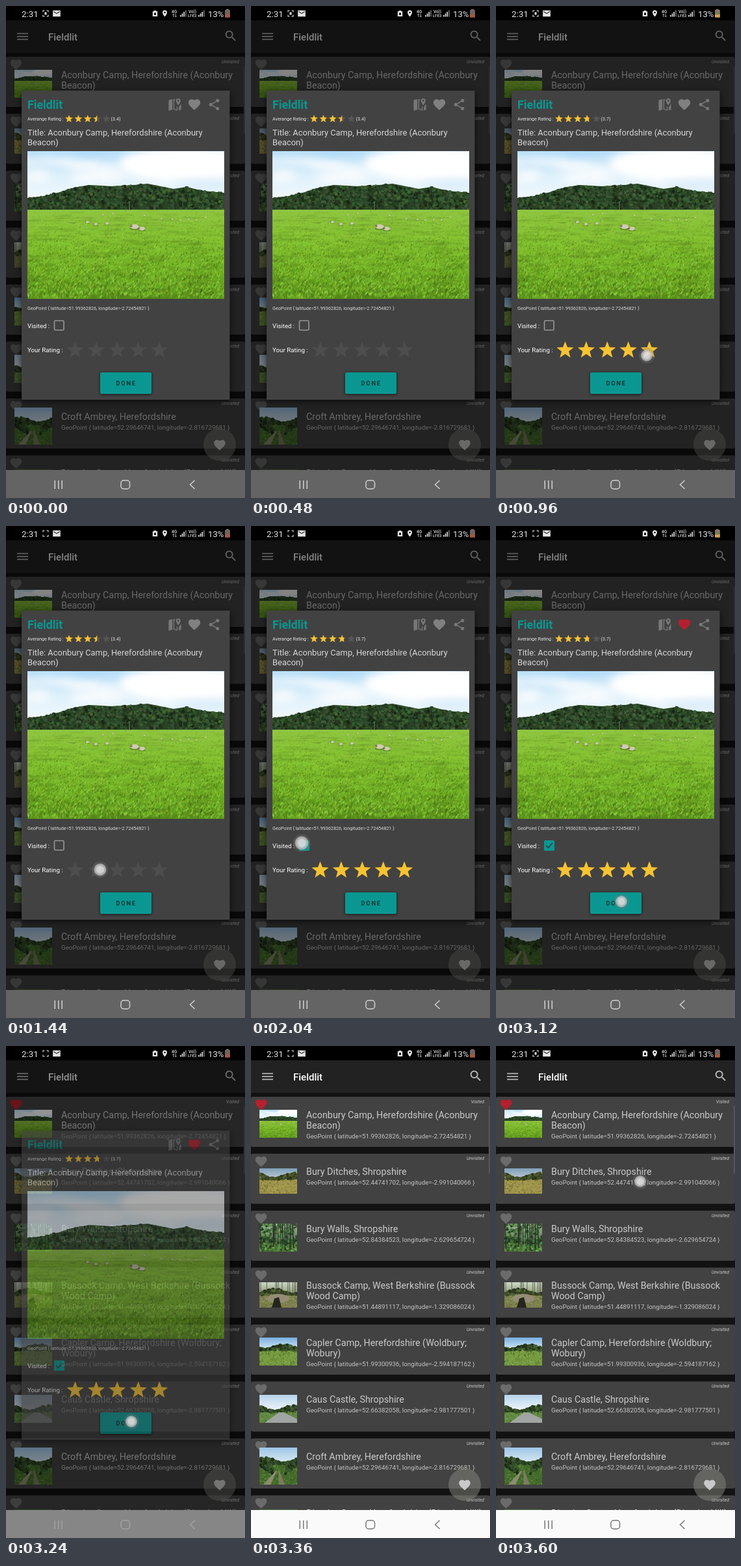
An HTML page with a canvas for the animation above (3.72 s loop, 368 by 756 pixels).

```html
<!DOCTYPE html>
<html lang="en">
<head>
<meta charset="utf-8">
<title>Fieldlit</title>
<style>
html, body { margin: 0; width: 100%; height: 100%; overflow: hidden; background: #000; }
canvas { display: block; }
</style>
</head>
<body>
<canvas id="stage" width="368" height="756"></canvas>
<script>
const W = 368, H = 756, LOOP = 3720, STEP = 120, TAU = Math.PI * 2;
const TEAL = '#0a9792', GOLD = '#f8c331', RED = '#b5202f';
const ICONS = {
  heart: 'M12 21.35l-1.45-1.32C5.4 15.36 2 12.28 2 8.5 2 5.42 4.42 3 7.5 3c1.74 0 3.41.81 4.5 2.09C13.09 3.81 14.76 3 16.5 3 19.58 3 22 5.42 22 8.5c0 3.78-3.4 6.86-8.55 11.54z',
  search: 'M15.5 14h-.8l-.3-.3A6.5 6.5 0 1 0 13.7 14.4l.3.3v.8l5 5 1.5-1.5zM9.5 14a4.5 4.5 0 1 1 0-9 4.5 4.5 0 0 1 0 9z',
  share: 'M18 16c-.8 0-1.4.3-2 .8l-7.1-4.1c.1-.5.1-.9 0-1.4L16 7.2A3 3 0 1 0 15 5l.1.7L8 9.8a3 3 0 1 0 0 4.4l7.1 4.2A2.9 2.9 0 1 0 18 16z',
  map: 'M2 5l6-2v17l-6 2zM9.5 3l3 1v2l-1.500-.5v13l4 1.500v-6l1.500 2v6l-7-2.500zM18.500 16l3.500-5v9l-3.500 1.500zM17.500 2a3.700 3.700 0 0 0-3.700 3.700c0 3 3.700 7.300 3.700 7.300s3.700-4.300 3.700-7.300A3.700 3.700 0 0 0 17.500 2zm0 2.300a1.400 1.400 0 1 1 0 2.800 1.400 1.400 0 0 1 0-2.800z',
  pin: 'M12 2a7 7 0 0 0-7 7c0 5.2 7 13 7 13s7-7.800 7-13a7 7 0 0 0-7-7zm0 4.500a2.500 2.500 0 1 1 0 5 2.500 2.500 0 0 1 0-5z',
  mail: 'M2 4h20v16H2zM4 6v2l8 5 8-5V6l-8 5z',
  lock: 'M4 5h4V2h8v3h4v17H4zM9 11v6h6v-6h-1V9h-4v2z'
};
const stage = document.getElementById('stage').getContext('2d');
let g = stage;

function layer(w, h, draw) {
  const c = document.createElement('canvas'), previous = g;
  c.width = w; c.height = h;
  g = c.getContext('2d');
  draw();
  g = previous;
  return c;
}
function rect(x, y, w, h, color, r = 0) {
  g.fillStyle = color;
  g.beginPath(); g.roundRect(x, y, w, h, r); g.fill();
}
function raised(blur, ...box) {
  g.shadowColor = '#000a'; g.shadowBlur = blur; g.shadowOffsetY = blur / 4;
  rect(...box);
  g.shadowColor = 'transparent';
}
function disc(x, y, r, color, ry = r) {
  g.fillStyle = color;
  g.beginPath(); g.ellipse(x, y, r, ry, 0, 0, TAU); g.fill();
}
function line(points, color, width = 1) {
  g.strokeStyle = color; g.lineWidth = width;
  g.beginPath(); points.forEach(p => g.lineTo(...p)); g.stroke();
}
function poly(points, color) {
  g.fillStyle = color;
  g.beginPath(); points.forEach(p => g.lineTo(...p)); g.fill();
}
function text(s, x, y, size, color, style = '', align = 'left', spacing = 0) {
  g.font = `${style} ${size}px Roboto, sans-serif`;
  g.letterSpacing = spacing + 'px';
  g.fillStyle = color; g.textAlign = align;
  g.fillText(s, x, y);
}
function icon(name, x, y, size, color) {
  g.save();
  g.translate(x - size / 2, y - size / 2);
  g.scale(size / 24, size / 24);
  g.fillStyle = color;
  g.fill(new Path2D(ICONS[name]), 'evenodd');
  g.restore();
}
function fade(y0, y1, ...colors) {
  const f = g.createLinearGradient(0, y0, 0, y1);
  colors.forEach((c, i) => f.addColorStop(i / (colors.length - 1), c));
  return f;
}
function random(seed) {
  return () => (seed = seed * 16807 % 2147483647) / 2147483647;
}

// Landscapes
const MEADOW = layer(303, 227, () => {
  const rnd = random(77);
  rect(0, 0, 303, 90, fade(0, 80, '#b6def8', '#dff1fb', '#f4fafc'));
  g.filter = 'blur(7px)';
  for (let i = 0; i < 13; i++) disc(rnd() * 130, 10 + rnd() * 45, 16 + rnd() * 16, '#ffffffa0', 7);
  disc(245, 20, 105, '#fff', 28);
  disc(60, 3, 55, '#addaf7', 6);
  disc(270, 50, 45, '#d3e9f8', 5);
  g.filter = 'none';
  const ridge = [[0, 70], [25, 67], [50, 61], [72, 54], [95, 50], [130, 52], [165, 50], [185, 48], [205, 52], [225, 56], [245, 53], [270, 59], [303, 62]];
  poly([...ridge.map(([x, y]) => [x, y + 2]), [303, 92], [0, 92]], '#2a4526');
  const top = x => {
    const i = Math.max(1, ridge.findIndex(p => p[0] >= x));
    const [a, b] = [ridge[i - 1], ridge[i]];
    return a[1] + (b[1] - a[1]) * (x - a[0]) / (b[0] - a[0]);
  };
  for (let i = 0; i < 1500; i++) {
    const x = rnd() * 302, y0 = top(x) + 3, d = rnd();
    disc(x, y0 + d * (89 - y0), .7 + rnd() * 2.3, `hsl(${92 + rnd() * 35} ${20 + rnd() * 18}% ${11 + rnd() * 20}%)`);
  }
  rect(0, 90, 303, 137, fade(90, 227, '#8fc440', '#82be2f', '#70ad23', '#5b931c'));
  // Uneven ground, coarser towards the viewer
  for (let i = 0; i < 420; i++) {
    const d = rnd();
    disc(rnd() * 303, 91 + d * 136, 5 + rnd() * 17, `hsl(${78 + rnd() * 16} 68% ${rnd() < .55 ? 24 : 56}% / .13)`, 1 + d * 3);
  }
  for (let i = 0; i < 4600; i++) {
    const d = rnd() ** .8, x = rnd() * 303, y = 92 + d * 135;
    line([[x, y], [x + (rnd() - .5) * 7 * d + 1, y - 1 - d * 3]],
      `hsl(${77 + rnd() * 19} 66% ${20 + rnd() * 43}% / .55)`, .6 + d);
  }
  line([[157, 77], [157, 91]], '#718071', 1);
  const sheep = (x, y, s) => {
    disc(x, y + s * .45, s * 1.1, '#4f7822', s * .3);
    disc(x, y, s, '#d0cbb0', s * .58);
    disc(x - s * .8, y - s * .15, s * .3, '#847c69');
  };
  [[92, 109], [105, 112], [122, 111], [116, 98], [131, 96], [180, 99], [206, 104], [223, 105], [235, 106], [248, 105], [260, 106], [274, 102]]
    .forEach(([x, y], i) => sheep(x, y, i < 3 ? 3 : 1.7));
  sheep(176, 119, 5); sheep(165, 116, 6.5);
});

function scene({ seed, h, sky, ground, tree, horizon, detail }) {
  return layer(58, h, () => {
    const rnd = random(seed), y0 = h * horizon;
    rect(0, 0, 58, h, fade(0, y0, ...sky));
    rect(0, y0, 58, h, ground);
    for (let i = 0; i < 170; i++) {
      const x = rnd() * 58;
      disc(x, y0 - rnd() * (5 + 4 * Math.sin(x / 9 + seed)), 1 + rnd() * 2,
        `hsl(${tree} ${24 + rnd() * 18}% ${12 + rnd() * 19}%)`);
    }
    for (let i = 0; i < 260; i++) {
      disc(rnd() * 58, y0 + 1 + rnd() * (h - y0), 1, `hsl(${tree - 15} 42% ${18 + rnd() * 38}% / .4)`);
    }
    if (detail) detail(rnd, h);
  });
}
function woods(rnd, h) {
  for (let i = 0; i < 330; i++) {
    disc(rnd() * 58, rnd() * h, .5 + rnd() * 2, `hsl(${90 + rnd() * 35} 32% ${10 + rnd() * 46}% / .75)`);
  }
  for (let i = 0; i < 13; i++) {
    const x = rnd() * 58;
    line([[x, 0], [x + rnd() * 3 - 1, h * (.7 + rnd() * .25)]], '#263127', .7 + rnd());
  }
}
function stump(rnd, h) {
  for (let i = 0; i < 11; i++) {
    const x = rnd() * 58;
    line([[x, 0], [x, h * .5]], '#445039', .8);
  }
  disc(29, 25, 17, '#948c75', 7);
  poly([[19, 39], [23, 25], [30, 23], [34, 39]], '#24261d');
}
function lane(rnd) {
  for (let i = 0; i < 150; i++) {
    const side = rnd() < .6, d = rnd();
    disc(side ? d * 21 : 58 - d * 18, 17 + d * 14 + rnd() * 10, 1 + rnd() * 2, `hsl(102 32% ${10 + rnd() * 18}%)`);
  }
  poly([[25, 36], [27, 36], [17, 57], [6, 57]], '#8d8c72');
  poly([[29, 36], [31, 36], [39, 57], [30, 57]], '#7c7b60');
}
const THUMBS = [
  MEADOW,
  scene({ seed: 21, h: 39, sky: ['#7f9fb9', '#c0cbd2'], ground: '#a2954f', tree: 75, horizon: .42 }),
  scene({ seed: 32, h: 43, sky: ['#a3b99c', '#556f49'], ground: '#4c7436', tree: 108, horizon: .68, detail: woods }),
  scene({ seed: 43, h: 39, sky: ['#cfd7c8', '#8c9a74'], ground: '#7d8055', tree: 83, horizon: .48, detail: stump }),
  scene({ seed: 54, h: 43, sky: ['#78afe0', '#d9e9f3'], ground: '#779d43', tree: 98, horizon: .44 }),
  scene({ seed: 65, h: 43, sky: ['#b6d4ec', '#f4f7f9'], ground: '#608844', tree: 101, horizon: .6,
    detail: () => poly([[30, 27], [37, 27], [58, 37], [58, 43], [8, 43]], '#a0a5a3') }),
  scene({ seed: 76, h: 57, sky: ['#9dc5e7', '#dce9f0'], ground: '#426a2b', tree: 101, horizon: .43, detail: lane }),
  scene({ seed: 87, h: 40, sky: ['#4e7040', '#648747'], ground: '#567939', tree: 102, horizon: .4 })
];
const SITES = [
  ['Aconbury Camp, Herefordshire (Aconbury|Beacon)', '51.99362826', '-2.72454821'],
  ['Bury Ditches, Shropshire', '52.44741702', '-2.991040066'],
  ['Bury Walls, Shropshire', '52.84384523', '-2.629654724'],
  ['Bussock Camp, West Berkshire (Bussock|Wood Camp)', '51.44891117', '-1.329086024'],
  ['Capler Camp, Herefordshire (Woldbury;|Wobury)', '51.99300936', '-2.594187162'],
  ['Caus Castle, Shropshire', '52.66382058', '-2.981777501'],
  ['Croft Ambrey, Herefordshire', '52.29646741', '-2.816729681'],
  ['Dinedor Camp, Herefordshire (Dinedor Hill)', '52.02349600', '-2.696478000']
];
const geo = ([, lat, lon]) => `GeoPoint { latitude=${lat}, longitude=${lon} }`;

function drawList(saved) {
  rect(0, 0, W, H, '#121212');
  rect(0, 22, W, 50, '#222');
  [42, 46.5, 51].forEach(y => rect(17, y - .5, 17, 1.7, '#b9b9b9'));
  text('Fieldlit', 65, 52.5, 15, '#fff', '500');
  icon('search', 346, 46, 22, '#bdbdbd');
  SITES.forEach((site, i) => {
    const y = 78 + i * 87.5, lines = site[0].split('|'), pic = THUMBS[i];
    const h = i ? pic.height : 43;
    rect(0, y, W, 77, '#424242', 3);
    icon('heart', 15.5, y + 12, 21, saved && !i ? RED : '#6b6b6b');
    g.drawImage(pic, 13, Math.round(y + 41.5 - h / 2 + (i === 6 ? .5 : 0)), 58, h);
    lines.forEach((s, n) => text(s, 85, y + 32.5 + n * 16.3, 14.3, '#cacaca'));
    text(geo(site), 85, y + 47.5 + (lines.length - 1) * 16.3, 9.77, '#c4c4c4');
    text(saved && !i ? 'Visited' : 'Unvisited', 359, y + 9.5, 6.8, '#c9c9c9', 'italic', 'right');
  });
  rect(366, 92, 2, 104, '#565656');
  disc(329, 674, 25, '#86868080');
  icon('heart', 329, 674.5, 21, '#c9c9c9');
}

function drawStatus(t) {
  rect(0, 0, W, 22, '#000');
  const c = '#e4e4e4';
  text('2:31', 24, 16.5, 13.4, c);
  [[57, 7, 1, 1], [65, 7, -1, 1], [57, 16, 1, -1], [65, 16, -1, -1]].forEach(([x, y, a, b]) =>
    line([[x, y + b * 2.5], [x, y], [x + a * 2.5, y]], c, 1.1));
  if (t < 1200 || t >= 3480) rect(59.5, 9.5, 3, 4, c);
  icon('mail', 78, 11.5, 14, c);
  icon('lock', 229.5, 11.5, 11, c);
  icon('pin', 244.5, 11.5, 12, c);
  text('4G', 255, 10.5, 6.5, c, '500');
  line([[258, 17], [258, 12], [256.5, 14]], c, .8);
  line([[261, 12], [261, 17], [262.5, 15]], c, .8);
  text('Vo))', 281, 10.5, 6.3, c, '500');
  text('LTE2', 280, 17, 6.2, c, '500');
  [268, 296].forEach(x => {
    for (let i = 0; i < 4; i++) rect(x + i * 2.7, 14 - i * 2.5, 1.6, 2.5 + i * 2.5, i < 3 ? c : '#777');
  });
  text('13%', 311, 16.5, 13.2, c);
  const bright = t >= 840 && t < 1200 || t >= 2400 && t < 3240;
  rect(339, 5, 4, 2, '#8b8580');
  rect(337, 6, 8, 11.5, bright ? '#81765c' : '#71625b', 1);
  rect(337, 13, 8, 4.5, bright ? '#c8a64b' : '#a6583c', 1);
}

function drawNav(background, color) {
  rect(0, 713, W, 43, background);
  [75, 80.5, 86].forEach(x => rect(x - .5, 729, 1.5, 13, color));
  g.strokeStyle = color; g.lineWidth = 1.5;
  g.beginPath(); g.roundRect(177, 729, 13.5, 13, 4); g.stroke();
  line([[290.5, 729], [283.5, 735.5], [290.5, 742]], color, 1.5);
}

function stars(x, y, gap, r, value, empty) {
  for (let i = 0; i < 5; i++) {
    const cx = x + i * gap, part = Math.max(0, Math.min(1, value - i));
    const points = Array.from({ length: 10 }, (_, k) => {
      const a = k * TAU / 10, q = k % 2 ? r * .42 : r;
      return [cx + q * Math.sin(a), y - q * Math.cos(a)];
    });
    poly(points, empty);
    g.save();
    g.beginPath(); g.rect(cx - r, y - r, 2 * r * part, 2 * r); g.clip();
    poly(points, GOLD);
    g.restore();
  }
}

function drawDialog({ rating, check, liked }) {
  raised(10, 24, 130, 320.5, 475, '#424242', 1);
  text('Fieldlit', 33, 158, 17.8, TEAL, 'bold');
  icon('map', 260, 151.5, 23, '#777');
  icon('heart', 290, 151.5, 22, liked ? RED : '#808080');
  icon('share', 320.5, 151.5, 21, '#777');
  const average = rating ? 3.7 : 3.4;
  text('Averange Rating :', 33, 175.5, 7.2, '#e4e4e4');
  stars(97, 173.5, 14.4, 6.3, rating ? 3.75 : 3.5, '#575757');
  text(`(${average})`, 161.5, 175.5, 7.2, '#e4e4e4');
  text('Title: Aconbury Camp, Herefordshire (Aconbury', 33, 198.7, 12.92, '#d6d6d6');
  text('Beacon)', 33, 213.5, 12.92, '#d6d6d6');
  g.drawImage(MEADOW, 33, 223);
  text(geo(SITES[0]), 33, 467, 7.23, '#dadada');
  text('Visited :', 33, 494.5, 9.65, '#fff');
  if (check) rect(74, 483, 16, 16, TEAL, 1.5);
  else {
    g.strokeStyle = '#969696'; g.lineWidth = 1.6;
    g.beginPath(); g.roundRect(74.5, 483.5, 14.5, 14.5, 1.5); g.stroke();
  }
  if (check > 1) line([[77, 491], [80.5, 494.5], [87, 487]], '#343f40', 1.7);
  text('Your Rating :', 33, 532, 9.75, '#fff');
  stars(106.5, 529, 32.4, 13.8, rating, '#4d4d4d');
  raised(4, 145, 563, 79, 33, TEAL, 2.5);
  text('DONE', 169.5, 583, 9.2, '#0c2524', '500', 'left', 1.8);
}

// Taps: start, end, x, y, radius
const TAPS = [
  [840, 1200, 232, 537, 9], [1320, 1560, 145, 528, 9.5], [1680, 1800, 236, 531, 9],
  [1920, 2280, 78, 487, 10.5], [2520, 2760, 290, 153, 9], [3000, 3360, 193, 577, 9],
  [3480, 3720, 222, 208, 9]
];
function drawTap(t) {
  const tap = TAPS.find(([a, b]) => t >= a && t < b);
  if (!tap) return;
  const [, , x, y, r] = tap;
  disc(x, y, r + 3, '#7777774d');
  const glow = g.createRadialGradient(x, y, r * .5, x, y, r);
  glow.addColorStop(0, '#e2e2e2e0');
  glow.addColorStop(1, '#b8b8b8a8');
  disc(x, y, r, glow);
}

function render(t) {
  const open = t < 3240, closing = t === 3240;
  const rating = t >= 1680 || t >= 960 && t < 1320 ? 5 : t === 1560 ? 2 : 0;
  const state = { rating, check: t < 2040 ? 0 : t < 2160 ? 1 : 2, liked: t >= 2640 };
  drawList(!open);
  if (open || closing) {
    rect(0, 22, W, 691, open ? '#0000007c' : '#0000006c');
    const dialog = layer(W, H, () => drawDialog(state));
    g.globalAlpha = open ? 1 : .6;
    g.drawImage(dialog, 0, 0);
    g.globalAlpha = 1;
  }
  drawStatus(t);
  if (open) drawNav('#646464', '#d0d0d0');
  else drawNav(closing ? '#868686' : '#fafafa', closing ? '#a2a2a2' : '#777');
  drawTap(t);
}

const start = performance.now();
let shown = -1;
function tick() {
  const t = Math.floor((performance.now() - start) % LOOP / STEP) * STEP;
  if (t !== shown) render(shown = t);
  requestAnimationFrame(tick);
}
tick();
</script>
</body>
</html>
```
